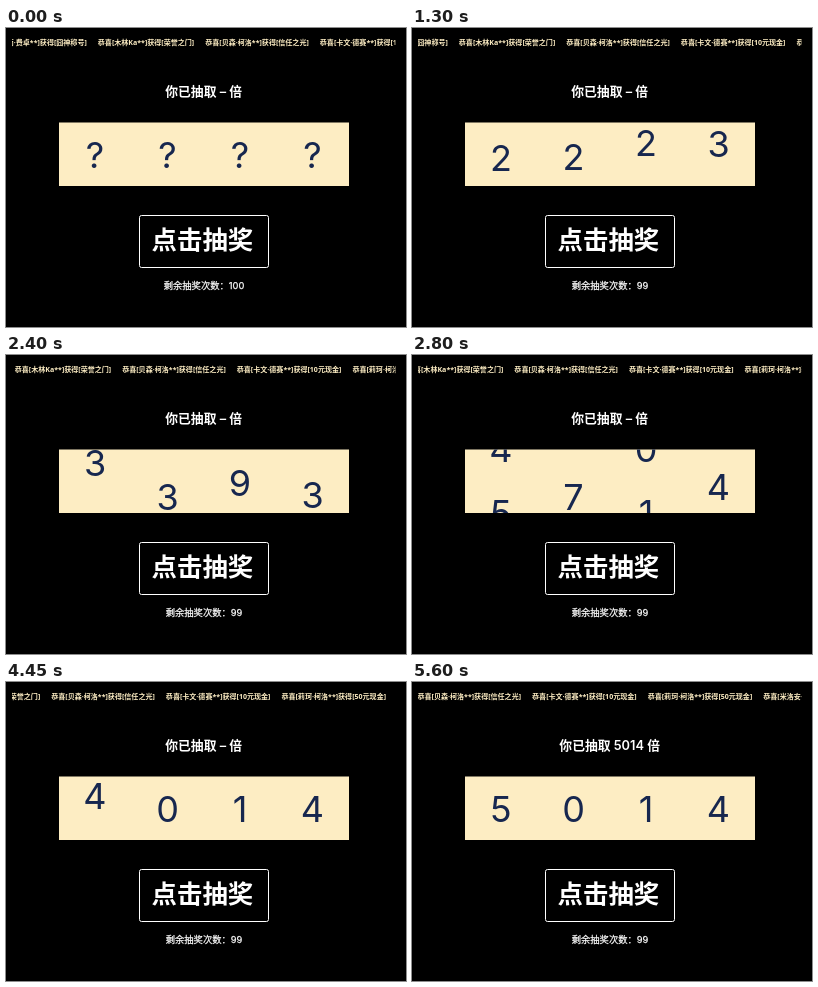
Animation, 400 px wide and 299 px high, one loop 5650 ms. Source, as an HTML page:

```html
<!DOCTYPE html>
<html lang="zh-CN">
<head>
<meta charset="utf-8">
<title>抽奖</title>
<style>
html, body { margin: 0; height: 100%; overflow: hidden; background: #000; }
svg { display: block; width: 100vw; height: 100vh; }
text { font-family: Inter, "Noto Sans CJK SC", "Noto Sans CJK", sans-serif; fill: #fff; white-space: pre; }
.mid text { text-anchor: middle; }
#news { font-family: "Noto Sans", "Noto Sans CJK SC", "Noto Sans CJK", sans-serif; font-size: 7.05px; font-weight: 600; fill: #fdedc3; }
#reels text { font-size: 36px; fill: #17274f; text-anchor: middle; }
#left { stroke: #fff; stroke-width: .25px; }
</style>
</head>
<body>
<svg viewBox="0 0 400 299">
  <defs>
    <clipPath id="newsClip"><rect x="6" y="5" width="383.5" height="18"/></clipPath>
    <clipPath id="reelClip"><rect x="53" y="94.5" width="290" height="63.5"/></clipPath>
  </defs>
  <g clip-path="url(#newsClip)"><text id="news" y="16.6"></text></g>
  <rect x="53" y="94.5" width="290" height="63.5" fill="#fdedc3"/>
  <g id="reels" clip-path="url(#reelClip)"></g>
  <rect x="133.5" y="187.5" width="129" height="52" rx="2" fill="none" stroke="#fff"/>
  <g class="mid">
    <text id="result" x="197.7" y="67.9" font-size="12.8" font-weight="600"></text>
    <text x="196.4" y="220.8" font-size="25.4" font-weight="700">点击抽奖</text>
    <text id="left" x="198" y="260.8" font-size="9.3"></text>
  </g>
  <path id="hand" d="M2.4 6V1.2a.8.8 0 0 1 1.7 0V4l3.4.7q1 .2.9 1.3l-.5 2.6-.8 1.4H3.5L.5 6.6q.6-1 1.9 0Z"
    fill="#fff" stroke="#000" stroke-width=".7"/>
</svg>
<script>
const LOOP = 5650, STEP = 50, START = 460;
const CELL = 64, BASE = 140.2;
const NEWS_X = -22.8, NEWS_GAP = 11, NEWS_SPEED = .0346;
const $ = id => document.getElementById(id);

function add(parent, tag, attrs, text = "") {
  const el = document.createElementNS("http://www.w3.org/2000/svg", tag);
  for (const key in attrs) el.setAttribute(key, attrs[key]);
  el.textContent = text;
  return parent.appendChild(el);
}

const news = [
  ["维南·费卓**", "囧神称号"],
  ["木林Ka**", "荣誉之门"],
  ["贝森·柯洛**", "信任之光"],
  ["卡文·德赛**", "10元现金"],
  ["莉珂·柯洛**", "50元现金"],
  ["米洛安·柯洛**", "信任之光"]
];
news.forEach(([name, prize], i) =>
  add($("news"), "tspan", { dx: i ? NEWS_GAP : 0 }, `恭喜[${name}]获得[${prize}]`));

// Each reel turns through a number of cells and stops on the last digit.
const reels = [
  { cells: 55, time: 4530 },
  { cells: 30, time: 3390 },
  { cells: 21, time: 2750 },
  { cells: 24, time: 2480 }
];
reels.forEach((reel, i) => {
  const x = 89 + i * 72.5;
  reel.texts = [0, 1].map(() => add($("reels"), "text", { x }));
});
const DONE = START + Math.max(...reels.map(r => r.time));

const clamp = x => Math.min(1, Math.max(0, x));
const circIn = x => (1 - Math.sqrt(1 - 4 * x * x)) / 2;
const circInOut = x => x < .5 ? circIn(x) : 1 - circIn(1 - x);

function drawReel({ cells, time, texts }, t) {
  const pos = cells * circInOut(clamp((t - START) / time));
  const first = Math.floor(pos);
  texts.forEach((el, k) => {
    el.textContent = t < START ? "?" : (first + k) % 10;
    el.setAttribute("y", BASE + (first + k - pos) * CELL);
  });
}

// The pointer rises to the button, clicks and leaves to the right.
function drawHand(t) {
  const away = 1 - clamp((t - 50) / 350), leave = clamp((t - 800) / 400);
  const x = 200 + 22 * away + 200 * leave;
  const y = 214 + 86 * away + 48 * leave;
  $("hand").setAttribute("transform", `translate(${x} ${y})`);
}

function draw(t) {
  $("news").setAttribute("x", NEWS_X - t * NEWS_SPEED);
  $("result").textContent = `你已抽取 ${t < DONE ? "–" : "5014"} 倍`;
  $("left").textContent = `剩余抽奖次数：${t < START ? 100 : 99}`;
  for (const reel of reels) drawReel(reel, t);
  drawHand(t);
}

function frame() {
  const t = performance.now() % LOOP;
  draw(Math.floor(t / STEP) * STEP);
  requestAnimationFrame(frame);
}
frame();
</script>
</body>
</html>
```
